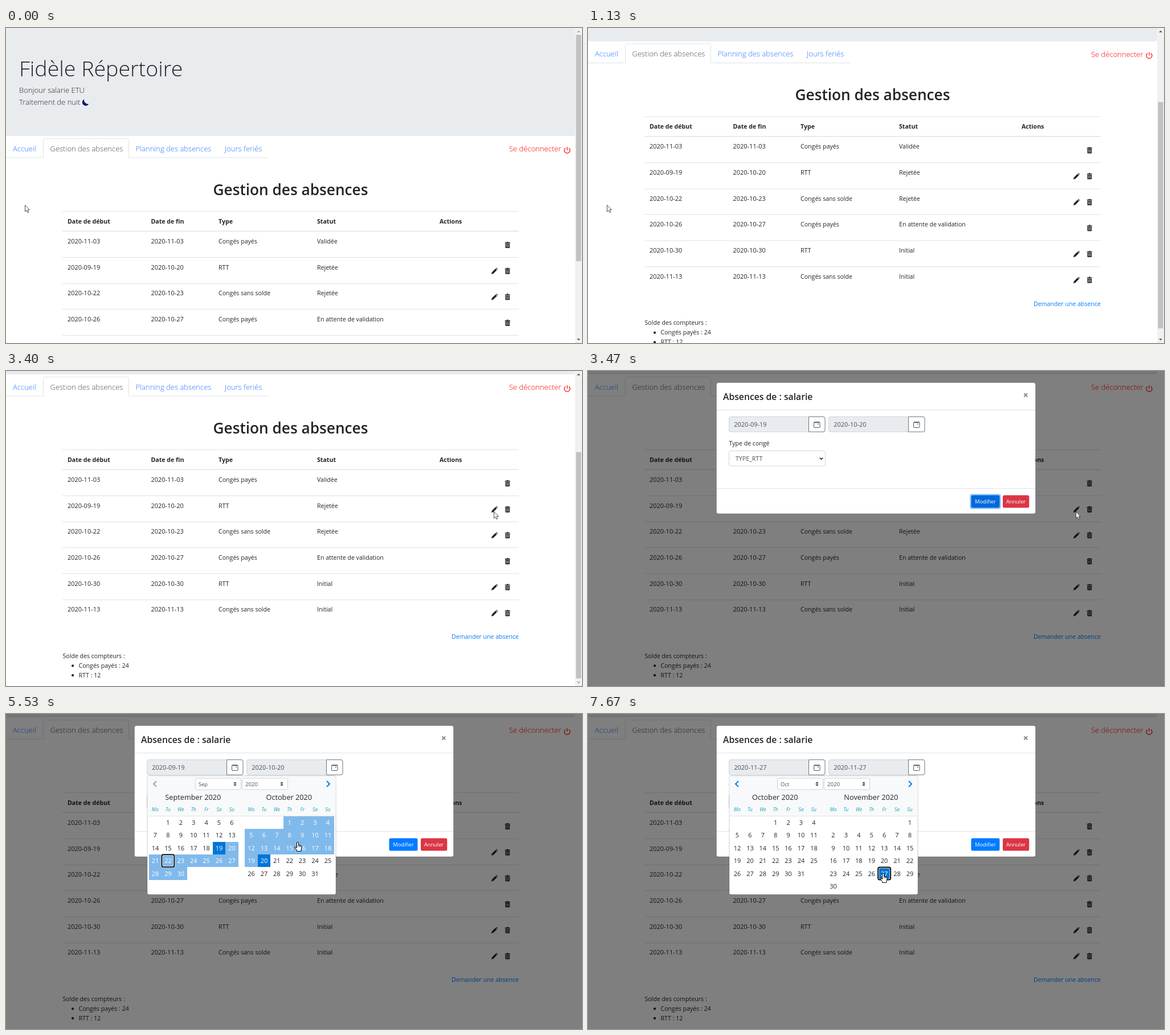
An HTML page with a canvas for the animation above (8000 ms loop, 1011 by 554 pixels).

```html
<!DOCTYPE html>
<html lang="fr">
<head>
<meta charset="utf-8">
<title>Gestion des absences</title>
<style>
html, body { margin: 0; height: 100%; overflow: hidden; background: #fff; }
canvas { display: block; }
</style>
</head>
<body>
<canvas id="stage" width="1011" height="554"></canvas>
<script>
const ctx = document.getElementById('stage').getContext('2d');
const LOOP = 8000, STEP = 1000 / 15;
const INK = '#212529', BLUE = '#007bff', TAB = '#2a76ff', GREY = '#6c757d', FIELD = '#495057';
const LINE = '#dee2e6', EDGE = '#ced4da', PICK = '#0275d8', RANGE = '#80baeb';

// Moments of the story, in steps of 1/15 s
const OPEN = 52, PRESS = 71, POPUP = 73, NEXT = 95, FROM = 108, TO = 115;

const scrollKeys = [[11, 0], [14, 83.4], [17, 166.6], [18, 166.6], [19, 174], [20, 179], [21, 182], [22, 184]];
const cursorKeys = [
  [26, 33, 311], [30, 200, 370], [33, 420, 383], [36, 630, 345], [39, 783, 296], [43, 835, 262],
  [47, 854, 250], [51, 856, 247], [53, 856, 247], [56, 640, 200], [59, 330, 150], [60, 262, 130],
  [62, 350, 105], [63, 396, 92], [65, 400, 101], [67, 406, 105], [72, 406, 105], [76, 440, 150],
  [80, 490, 205], [83, 512, 225], [85, 516, 222], [89, 545, 170], [93, 565, 121], [96, 566, 121],
  [99, 562, 140], [104, 530, 235], [108, 518, 280]
];

const clamp = v => Math.max(0, Math.min(1, v));

function at(keys, n) {
  let i = 0;
  while (i < keys.length - 2 && n > keys[i + 1][0]) i++;
  const a = keys[i], b = keys[i + 1], k = clamp((n - a[0]) / (b[0] - a[0]));
  return a.slice(1).map((v, j) => v + (b[j + 1] - v) * k);
}

function text(s, x, y, size = 11.2, color = INK, weight = 400, align = 'left', style = '') {
  const scale = /^\d/.test(s) ? .98 : weight < 400 ? .93 : weight === 600 ? .937 : .947;
  ctx.font = `${style} ${weight} ${size * scale}px "Open Sans", "Noto Sans", sans-serif`;
  ctx.fillStyle = color;
  ctx.textAlign = align;
  ctx.fillText(s, x, y);
}

function fill(x, y, w, h, color) {
  ctx.fillStyle = color;
  ctx.fillRect(x, y, w, h);
}

function box(x, y, w, h, r, color, edge, width = 1) {
  ctx.beginPath();
  ctx.roundRect(x, y, w, h, r);
  if (color) { ctx.fillStyle = color; ctx.fill(); }
  if (edge) { ctx.strokeStyle = edge; ctx.lineWidth = width; ctx.stroke(); }
}

function shape(d, x, y, color, edge, width = 1) {
  const p = new Path2D(d);
  ctx.save();
  ctx.translate(x, y);
  if (color) { ctx.fillStyle = color; ctx.fill(p); }
  if (edge) { ctx.strokeStyle = edge; ctx.lineWidth = width; ctx.stroke(p); }
  ctx.restore();
}

function trash(x, y) {
  shape('M-4.6-4.4h3v-1.1h3.2v1.1h3V-3h-9.2zM-3.9-2.3h7.8v6.6q0 1.2-1.2 1.2h-5.4q-1.2 0-1.2-1.2z', x, y, INK);
  shape('M-2-1V4M0-1V4M2-1V4', x, y, null, '#fff', .7);
}

function pencil(x, y) {
  shape('M-5.6 5.6l1-3.5 6.4-6.4 2.5 2.5-6.4 6.4zM2.5-5.1l.9-.7 2.4 2.4-.8.9z', x, y, INK);
}

const columns = [108, 254.5, 373, 546, 761];
const rows = [
  ['2020-11-03', '2020-11-03', 'Congés payés', 'Validée'],
  ['2020-09-19', '2020-10-20', 'RTT', 'Rejetée'],
  ['2020-10-22', '2020-10-23', 'Congés sans solde', 'Rejetée'],
  ['2020-10-26', '2020-10-27', 'Congés payés', 'En attente de validation'],
  ['2020-10-30', '2020-10-30', 'RTT', 'Initial'],
  ['2020-11-13', '2020-11-13', 'Congés sans solde', 'Initial']
];

function page(scroll) {
  ctx.save();
  ctx.translate(0, -scroll);
  box(0, 0, 999, 190, 4, '#e9ecef');
  text('Fidèle Répertoire', 23, 85, 40.4, INK, 300);
  text('Bonjour salarie ETU', 23, 114, 14, INK, 300);
  text('Traitement de nuit', 23, 135, 14, '#22243c', 300);
  shape('M137 125.2a6.2 6.2 0 1 0 8.4 8.4a7.5 7.5 0 0 1-8.4-8.4z', 0, 0, '#191970');

  fill(0, 227.5, 461, 1, LINE);
  box(65.5, 194.5, 150, 37, 3, '#fff', LINE);
  fill(60, 228.5, 160, 5, '#fff');
  fill(66, 227, 149, 2, '#fff');
  text('Accueil', 12, 217, 14, TAB, 300);
  text('Gestion des absences', 77.5, 217, 14, FIELD, 300);
  text('Planning des absences', 227.5, 217, 14, TAB, 300);
  text('Jours feriés', 384, 217, 14, TAB, 300);
  text('Se déconnecter', 883, 217.4, 14, 'red', 300);
  shape('M-3-3.8a5 5 0 1 0 6 0M0-6V0', 985, 215, null, 'red', 1.2);

  text('Gestion des absences', 499.5, 294, 28, INK, 600, 'center');
  fill(99, 322, 801, 1, LINE);
  fill(99, 356.6, 801, 1.4, LINE);
  ['Date de début', 'Date de fin', 'Type', 'Statut', 'Actions']
    .forEach((s, i) => text(s, columns[i], 344, 11.2, INK, 700));
  rows.forEach((row, i) => {
    const y = 45.64 * i;
    if (i) fill(99, Math.round(357.5 + y), 801, 1, LINE);
    row.forEach((s, j) => text(s, columns[j], 379 + y));
    if (i % 3) pencil(857.5, 381.7 + y);
    trash(880.3, 381.5 + y);
  });
  text('Demander une absence', 900, 655.3, 11.2, BLUE, 400, 'right');
  text('Solde des compteurs :', 99.5, 689);
  ['Congés payés : 24', 'RTT : 12'].forEach((s, i) => {
    text(s, 127.5, 706 + 16.8 * i);
    box(115, 700.3 + 16.8 * i, 4.2, 4.2, 2.1, INK);
  });
  ctx.restore();
}

function scrollbar(scroll) {
  fill(999, 0, 12, 554, '#f1f1f1');
  fill(1000.5, 12 + scroll * .71, 9, 398, '#c1c1c1');
  shape('M-3 1.5L0-1.5 3 1.5z', 1005, 6, scroll ? '#505050' : '#a3a3a3');
  shape('M-3-1.5L0 1.5 3-1.5z', 1005, 548, scroll < 184 ? '#505050' : '#a3a3a3');
}

function dateField(x, value, hover, ring) {
  box(x + .5, 80.5, 140, 26.5, [3, 0, 0, 3], '#e9ecef', EDGE);
  text(value, x + 9.3, 98.3, 11.2, value < 'a' ? FIELD : GREY);
  const bx = x + 140.5;
  if (ring) box(bx - 1, 79.5, 30, 28.5, 4, 'rgba(108,117,125,.5)');
  box(bx, 80.5, 28.5, 26.5, [0, 3, 3, 0], '#fff', GREY);
  if (hover) {
    ctx.globalAlpha = hover;
    box(bx, 80.5, 28.5, 26.5, [0, 3, 3, 0], GREY);
    ctx.globalAlpha = 1;
  }
  const tone = (from, to) => Math.round(from + (to - from) * hover);
  const color = `rgb(${tone(80, 255)},${tone(87, 255)},${tone(94, 255)})`;
  box(bx + 9, 90, 10.5, 9.5, 1.5, null, color);
  fill(bx + 9, 89.5, 10.5, 1.7, color);
  fill(bx + 15.5, 92.6, 1.6, 1.6, color);
}

function modal(n) {
  fill(0, 0, 1011, 554, 'rgba(0,0,0,.5)');
  box(225.5, 20.5, 560, 230.5, 3.5, '#fff', 'rgba(0,0,0,.2)');
  text('Absences de : salarie', 237, 51, 16.8, INK, 600);
  shape('M-3-3L3 3M3-3L-3 3', 768.3, 42.3, null, '#7f7f7f', 1.8);
  fill(226, 68, 559, 1, LINE);
  fill(226, 206, 559, 1, LINE);

  const hover = clamp((n - 62.6) / 2) * clamp((75 - n) / 2);
  dateField(247, n < FROM ? '2020-09-19' : '2020-11-27', hover, n >= PRESS && n < POPUP);
  dateField(422, n < FROM ? '2020-10-20' : n < TO ? 'yyyy-mm-dd' : '2020-11-27', 0, false);

  text('Type de congé', 247.5, 131);
  box(247.5, 140.5, 169, 26.5, 3, '#fff', EDGE);
  text('TYPE_RTT', 259, 158.4, 11.2, FIELD);
  shape('M-2.8-1.4L0 1.4 2.8-1.4', 409.5, 154, null, '#333', 1.5);

  const focus = n < PRESS;
  if (focus) box(670.3, 216.3, 54.4, 26.4, 4, 'rgba(38,143,255,.5)');
  box(672.5, 218.5, 50, 22, 2.5, focus ? '#0069d9' : BLUE);
  text('Modifier', 697.5, 233.2, 9.8, '#fff', 400, 'center');
  box(728, 218.5, 46.3, 22, 2.5, '#dc3545');
  text('Annuler', 751, 233.2, 9.8, '#fff', 400, 'center');
}

const CELL = 22.4, TOP = 179.8;
const MONTHS = ['September', 'October', 'November'];

function focusRing(x, y, w, h) {
  box(x, y, w, h, 3, null, '#fff', 3.5);
  box(x, y, w, h, 3, null, '#101010', 2);
}

function month(m, left, n, [cx, cy]) {
  text(`${MONTHS[m - 9]} 2020`, left + 77.5, 151, 13.44, INK, 400, 'center');
  'Mo Tu We Th Fr Sa Su'.split(' ').forEach((s, i) =>
    text(s, left + CELL * (i + .5), 171.2, 8.96, '#17a2b8', 400, 'center', 'italic'));

  const [first, last] = n < FROM ? [919, 1020] : [1127, 1127];
  const lead = (new Date(2020, m - 1, 1).getDay() + 6) % 7;
  const days = new Date(2020, m, 0).getDate();
  let ring;
  for (let d = 1; d <= days; d++) {
    const i = lead + d - 1, x = left + CELL * (i % 7), y = TOP + CELL * Math.floor(i / 7);
    const id = m * 100 + d;
    const over = cx >= x && cx < x + CELL && cy >= y && cy < y + CELL;
    const within = id > first && id < last;
    const dark = id === first || id === last || (over && !within);
    if (dark || within) {
      const x0 = Math.round(x), y0 = Math.round(y);
      fill(x0, y0, Math.round(x + CELL) - x0, Math.round(y + CELL) - y0, dark ? PICK : RANGE);
    }
    if (id === (n < NEXT ? 922 : n < FROM ? 0 : 1127)) ring = [x + .2, y + .2, CELL - .4, CELL - .4];
    text(String(d), x + CELL / 2, y + 15.2, 11.2, dark || within ? '#fff' : INK, 400, 'center');
  }
  if (ring) focusRing(...ring);
}

function picker(n, cursor) {
  const m = n < NEXT ? 9 : 10;
  box(248, 108.5, 331, 209, 3, '#fff', 'rgba(0,0,0,.2)');
  box(248.5, 109, 330, 70.5, [3, 3, 0, 0], '#f8f9fa');
  fill(248.5, 179, 330, 1, LINE);
  shape('M2.5-5L-2.5 0 2.5 5', 261.5, 123, null, m === 9 ? '#a0a5aa' : BLUE, 2);
  shape('M-2.5-5L2.5 0-2.5 5', 565.5, 123, null, BLUE, 2);
  if (n >= NEXT && n < FROM) focusRing(554.5, 110.5, 21.5, 25);
  [[332.5, MONTHS[m - 9].slice(0, 3)], [414.5, '2020']].forEach(([x, s]) => {
    box(x, 113, 80, 20, 3, '#fff', EDGE);
    text(s, x + 5.5, 127, 9.8, FIELD);
    shape('M-2.8-.8L0-3.8 2.8-.8zM-2.8 .8L0 3.8 2.8 .8z', x + 69.5, 123, '#343a40');
  });
  month(m, 250.8, n, cursor);
  month(m + 1, 419.3, n, cursor);
}

function pointer([x, y], hand) {
  if (hand) {
    shape('M-1.5 1Q0-.6 1.5 1V5.5L5.5 6.4Q7.3 7 7 9.5L6 13.5V16.4H-1.5V14.5L-4.9 10Q-5 7.8-3 9L-1.5 10.5z',
      x, y, '#fff', '#000');
    shape('M1.5 5.5V9M3.5 6V9M5.3 6.5V9', x, y, null, '#000', .7);
  } else {
    shape('M.5 .5V12L3.1 9.6 4.9 13.6 6.9 12.7 5.1 8.8H8.5z', x, y, '#fff', '#222', .8);
  }
}

function draw() {
  const n = Math.floor((performance.now() % LOOP + 4) / STEP);
  const [scroll] = at(scrollKeys, n);
  const cursor = at(cursorKeys, n);
  fill(0, 0, 1011, 554, '#fff');
  page(scroll);
  if (n < OPEN) scrollbar(scroll);
  else modal(n);
  if (n >= POPUP) picker(n, cursor);
  pointer(cursor, n > 62);
  requestAnimationFrame(draw);
}
draw();
</script>
</body>
</html>
```
